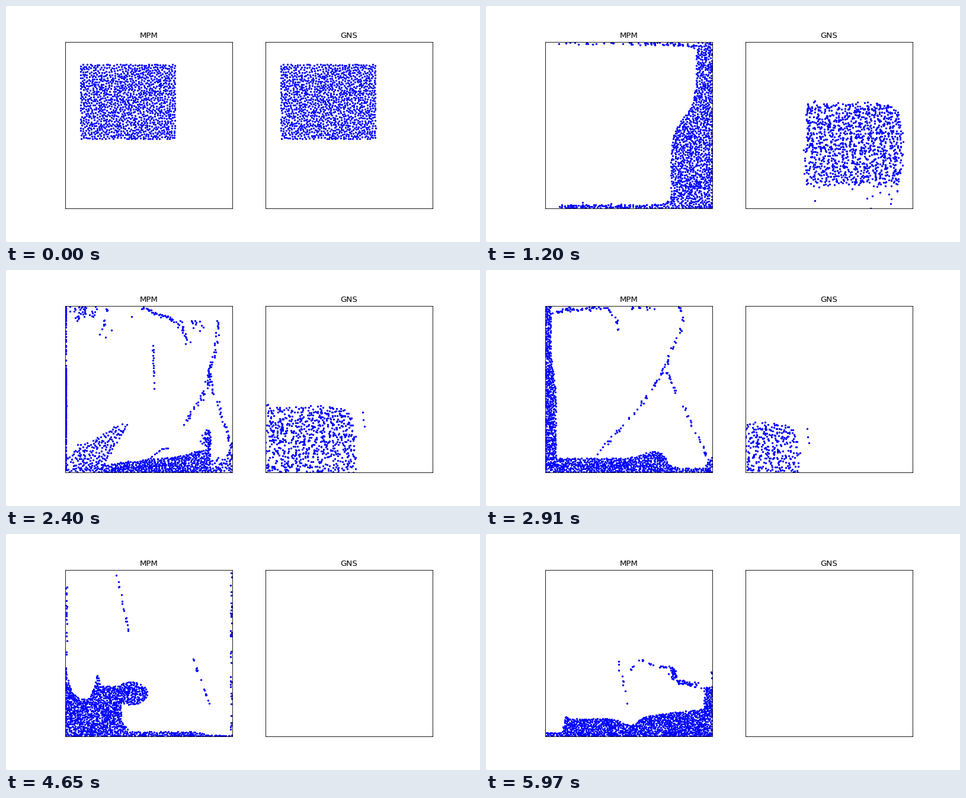
Write a matplotlib script that moves like this. It is 800x400 px and loops after 6 s.

```python
import matplotlib.pyplot as plt
import numpy as np
from matplotlib.animation import FuncAnimation

N = 1250
STEP = 30
FRAMES = 200
SIZE = 282  # panel side in pixels, origin at the lower left
rng = np.random.default_rng(7)


def rise(u, width):
    """Soft step: 0 for u << 0, 1 for u >> 0."""
    return 0.5 + 0.5 * np.tanh(u / width / 2)


def bump(u, width):
    return np.exp(-(u / width) ** 2)


def ramp(t, a, b):
    u = np.clip((t - a) / (b - a), 0, 1)
    return u * u * (3 - 2 * u)


def fill(inside, n, tries=8):
    """Spread n points evenly over a region (best candidate)."""
    pool = np.empty((0, 2))
    while len(pool) < n * tries:
        p = rng.uniform(0, SIZE, (20000, 2))
        pool = np.vstack([pool, p[inside(*p.T)]])
    out = pool[:n].copy()
    for i in range(1, n):
        c = pool[i * tries:(i + 1) * tries]
        d = ((c[:, None] - out[None, :i]) ** 2).sum(2).min(1)
        out[i] = c[d.argmax()]
    return out


def strand(n, spread, *pts):
    """Scatter n points along a polyline."""
    pts = np.array(pts, float)
    s = np.r_[0, np.hypot(*np.diff(pts, axis=0).T).cumsum()]
    u = np.sort(rng.random(n)) * s[-1]
    line = np.c_[np.interp(u, s, pts[:, 0]), np.interp(u, s, pts[:, 1])]
    return line + rng.normal(0, spread, (n, 2))


def match(a, b):
    """Reorder b so that each particle of a gets a nearby goal."""
    d = np.array([1, -0.6])
    out = np.empty_like(b)
    out[np.argsort(a @ d)] = b[np.argsort(b @ d)]
    for _ in range(3500):
        p = rng.permutation(N)
        i, j = p[:N // 2], p[N // 2:]
        swap = ((a[i] - a[j]) * (out[i] - out[j])).sum(1) < 0
        i, j = i[swap], j[swap]
        out[i], out[j] = out[j], out[i]
    return out


def boxed(p):
    return np.clip(p, 0.8, SIZE - 0.8)


def hermite(t, times, vals):
    last = len(times) - 1
    k = min(int(np.searchsorted(times, t, "right")) - 1, last - 1)

    def slope(m):
        a, b = max(m - 1, 0), min(m + 1, last)
        return (vals[b] - vals[a]) / (times[b] - times[a])

    h = times[k + 1] - times[k]
    u = (t - times[k]) / h
    return ((1 + 2 * u) * (1 - u) ** 2 * vals[k] + u * (1 - u) ** 2 * h * slope(k)
            + u * u * (3 - 2 * u) * vals[k + 1] + u * u * (u - 1) * h * slope(k + 1))


start = fill(lambda x, y: (abs(x - 105.5) < 80) & (abs(y - 181) < 63.5), N, 16)
times, poses = [0, 320], [start, start + (96, -34)]


def pose(t, inside, *strands):
    rest = N - sum(map(len, strands))
    times.append(t)
    poses.append(match(poses[-1], boxed(np.vstack([fill(inside, rest), *strands]))))


# Impact on the right wall, jets along ceiling and floor
pose(640, lambda x, y: (SIZE - x < 20 + 78 * rise(215 - y, 15)) & (y > 21))
pose(1200, lambda x, y: (SIZE - x < 27 + 43 * rise(154 - y, 15))
     | (y < 6 + 12 * rise(x - 205, 7)) & (x > 24),
     strand(40, 2, (24, 4), (200, 5)),
     strand(26, 1.3, (5, 281), (175, 279)),
     strand(40, 1.6, (175, 280), (255, 276)))
# Heap on the floor, thin film around the box
pose(1950, lambda x, y: (y < 3 + 0.22 * x + 8 * rise(x - 268, 4))
     | (SIZE - x < 13) & (y < 241) | (x < 7) & (y < 160),
     strand(35, 2, (4, 20), (4, 175)),
     strand(22, 1.2, (2, 180), (3, 282)),
     strand(14, 1.5, (9, 127), (19, 147)),
     strand(48, 1.7, (3, 274), (25, 279), (112, 278)),
     strand(10, 1.2, (129, 277), (136, 262)),
     strand(38, 1.7, (218, 281), (235, 274), (268, 237)),
     strand(5, 5, (50, 243), (199, 251)))
pose(2910, lambda x, y: (x < 9 + 9 * rise(170 - y, 15))
     | (y < 7 + 17 * rise(203 - x, 2) + 12 * bump(x - 185, 28) + 20 * rise(x - 273, 2)),
     strand(52, 1.6, (12, 270), (35, 276), (105, 279)),
     strand(12, 0.9, (108, 275), (120, 260), (122, 242)),
     strand(11, 1.3, (146, 279), (192, 279)),
     strand(9, 0.9, (226, 281), (233, 258)),
     strand(60, 1.3, (229, 245), (195, 165), (160, 113), (89, 31)),
     strand(40, 1.2, (206, 198), (206, 169), (273, 28)))
# Slosh up the left wall
pose(3870, lambda x, y: (x < 14 * rise(252 - y, 5) + 5 * bump(y - 232, 15) + 24 * rise(158 - y, 2)
                         + 9 * bump(y - 148, 12) + 14 * bump(y - 80, 14))
     | (y < 83 - 0.7 * x) & (x > 40) | (y < 3 + 20 * np.exp((x - SIZE) / 18)),
     strand(20, 1.8, (4, 281), (5, 243)),
     strand(18, 0.9, (47, 279), (75, 279), (83, 265)),
     strand(29, 1.4, (173, 280), (208, 277)),
     strand(13, 0.6, (135, 261), (149, 232)),
     strand(24, 0.7, (212, 263), (270, 119)),
     strand(30, 1, (280, 275), (280, 15)))
# Collapse into a wave that runs right
pose(4650, lambda x, y: (y < 62 + 23 * rise(x - 44, 3) + 20 * bump(x - 54, 4) + 60 * np.exp(-x / 8))
     & (x < 94 + 12 * bump(y - 12, 8)) | (((x - 110) / 29) ** 2 + ((y - 73) / 19) ** 2 < 1)
     | (y < 2 + 6 * rise(232 - x, 5)),
     strand(16, 0.7, (86, 278), (113, 152)),
     strand(15, 0.6, (215, 133), (244, 53)),
     strand(18, 1, (2, 255), (2, 135)),
     strand(42, 1, (280, 281), (280, 10)))
pose(5970, lambda x, y: (y < 6 + 24 * rise(x - 31, 2) + 7 * bump(x - 35, 4) - 12 * bump(x - 143, 18)
                         + 0.12 * np.maximum(x - 130, 0)) | (SIZE - x < 14) & (y < 85),
     strand(9, 1, (123, 132), (139, 50)),
     strand(22, 0.9, (143, 109), (157, 132), (187, 119), (211, 117)),
     strand(35, 2.8, (213, 115), (219, 99)),
     strand(38, 1.8, (223, 93), (265, 85)),
     strand(3, 0.5, (281, 93), (281, 110)))

# Drifting block of the right panel
x0, y0 = start.T
depth = (245 - y0) / 128
sag = 26 * np.clip((x0 - 152) / 34, 0, 1) ** 3 * (1 - depth) + 10 * depth ** 2
clump = 1.4 * np.sin(0.37 * x0 + 0.05 * y0) + 1.2 * np.sin(0.61 * x0 - 0.11 * y0)
jitter = rng.normal(0, 1, (N, 2)) * (1.5, 2.5)
fall_at = 600 + 2600 * np.sqrt(rng.random(N)) * (1.1 - 0.6 * depth)
falls = rng.random(N) < 0.45
stray = (rng.random(N) < 0.004) * (SIZE - 80 - x0)


def drifting(t):
    loose = ramp(t, 100, 1200)
    x = x0 + 270 * (1 - np.exp(-t / 661)) - 0.125 * t
    x += loose * (clump + jitter[:, 0]) + stray * ramp(t, 900, 1900)
    y = y0 - 0.0555 * t + loose * (jitter[:, 1] - sag)
    y -= falls * 0.0003 * np.maximum(t - fall_at, 0) ** 2
    return np.minimum(x, SIZE - 0.8), y


fig, axes = plt.subplots(1, 2, figsize=(10, 5), dpi=80)
dots = []
for ax, name in zip(axes, ("MPM", "GNS")):
    ax.set_title(name)
    ax.set(xlim=(0, SIZE), ylim=(0, SIZE), xticks=[], yticks=[], aspect=1)
    dots += ax.plot([], [], "o", ms=2, color="blue")


def draw(i):
    t = i * STEP
    dots[0].set_data(*boxed(hermite(t, times, poses)).T)
    dots[1].set_data(*drifting(t))
    return dots


anim = FuncAnimation(fig, draw, frames=FRAMES, interval=STEP, repeat=True, repeat_delay=0)
plt.show()
```
